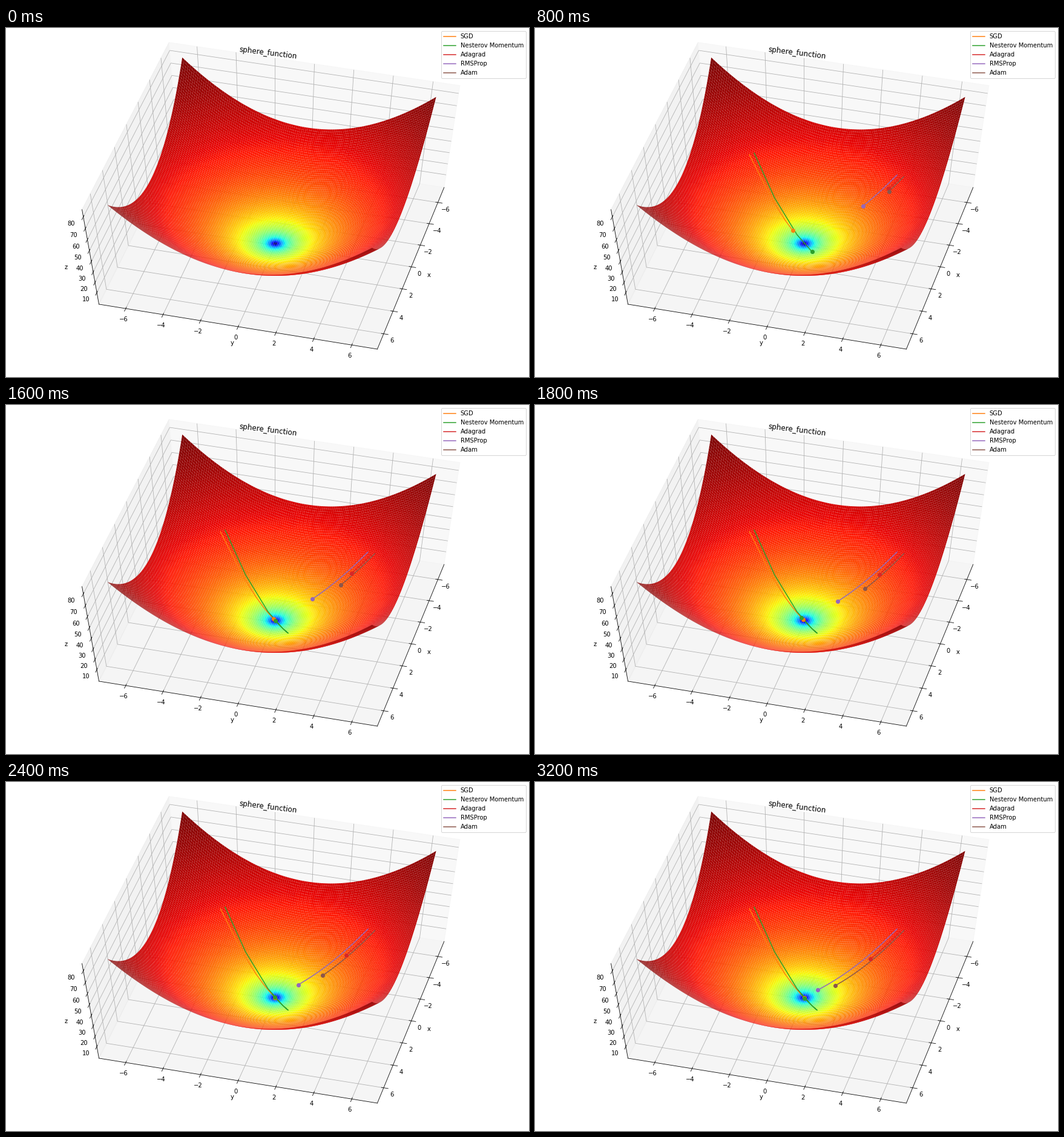
Animation of 864x576 px, one loop 3.4 s. Source, as a matplotlib script:

```python
import numpy as np
import matplotlib.pyplot as plt
from matplotlib.animation import FuncAnimation
from matplotlib.colors import LogNorm

FRAMES, INTERVAL = 17, 200
WIDTH, HEIGHT, DPI = 864, 576, 72
ELEV, AZIM, DIST = 60, 15, 10
LOW = np.array([-7.145, -7.145, 0.0])
HIGH = np.array([7.045, 7.045, 84.5])
RATE = 0.2


def sphere(x, y):
    return x**2 + y**2


def gradient(p):
    return 2 * p


# Each optimizer yields the step to add to the current point.
def sgd(p, n, state):
    return -RATE * gradient(p)


def nesterov(p, n, state, mu=0.9):
    v = mu * state.get("v", 0)
    state["v"] = v - RATE * gradient(p + v)
    return state["v"]


def adagrad(p, n, state):
    g = gradient(p)
    state["s"] = state.get("s", 0) + g**2
    return -RATE * g / np.sqrt(state["s"])


def rmsprop(p, n, state, rho=0.9):
    g = gradient(p)
    state["s"] = rho * state.get("s", 0) + (1 - rho) * g**2
    return -RATE * g / np.sqrt(state["s"])


def adam(p, n, state, b1=0.9, b2=0.999):
    g = gradient(p)
    state["m"] = b1 * state.get("m", 0) + (1 - b1) * g
    state["v"] = b2 * state.get("v", 0) + (1 - b2) * g**2
    return -RATE * state["m"] / (1 - b1**n) / np.sqrt(state["v"] / (1 - b2**n))


def trajectory(step, start):
    points, state = [np.array(start, float)], {}
    for n in range(1, FRAMES):
        points.append(points[-1] + step(points[-1], n, state))
    x, y = np.array(points).T
    return np.array([x, y, sphere(x, y)])


def projection():
    """Perspective view of the limits scaled to a unit cube."""
    e, a = np.radians([ELEV, AZIM])
    right = np.array([-np.sin(a), np.cos(a), 0])
    out = np.array([np.cos(e) * np.cos(a), np.cos(e) * np.sin(a), np.sin(e)])
    up = np.cross(out, right)
    view = np.array([[*right, 0], [*up, 0], [0, 0, 0, -DIST], [*-out, DIST]])
    world = np.diag([*1 / (HIGH - LOW), 1])
    world[:3, 3] = -(LOW + HIGH) / 2 / (HIGH - LOW)
    return view @ world


fig = plt.figure(figsize=(WIDTH / DPI, HEIGHT / DPI), dpi=DPI)
ax = fig.add_axes([0, 0, 1, 1], projection="3d", computed_zorder=False)
ax.view_init(ELEV, AZIM)

# Fill the whole stage instead of a centred square.
matrix = projection()
ax.get_proj = lambda: matrix
ax.apply_aspect = lambda position=None: None
ax.viewLim.intervalx = ax.viewLim.intervaly = (-0.95 / DIST, 0.9 / DIST)

grid = np.arange(-65, 65) / 10
X, Y = np.meshgrid(grid, grid)
ax.plot_surface(X, Y, sphere(X, Y), rstride=1, cstride=1, cmap="jet",
                norm=LogNorm(), edgecolor="none", zorder=1)

OPTIMIZERS = [
    ("SGD", sgd, (-4, -4)),
    ("Nesterov Momentum", nesterov, (-4.2, -3.8)),
    ("Adagrad", adagrad, (-4, 4)),
    ("RMSProp", rmsprop, (-4.2, 3.8)),
    ("Adam", adam, (-4, 4.2)),
]
tracks = []
for k, (label, step, start) in enumerate(OPTIMIZERS, 1):
    line, = ax.plot([], [], [], color=f"C{k}", label=label, zorder=5)
    dot, = ax.plot([], [], [], "o", color=f"C{k}", zorder=6)
    tracks.append((trajectory(step, start), line, dot))

ax.set_xticks(range(-6, 7, 2))
ax.set_yticks(range(-6, 7, 2))
ax.set_zticks(range(10, 81, 10))
ax.set(xlabel="x", ylabel="y", zlabel="z")
margin = (HIGH - LOW) / 48
limits = np.transpose([LOW - margin, HIGH + margin])
for set_limit, (low, high) in zip((ax.set_xlim, ax.set_ylim, ax.set_zlim), limits):
    set_limit(low, high)

ax.legend(loc="upper right")
fig.text(432.5 / WIDTH, 1 - 41.5 / HEIGHT, "sphere_function", fontsize=12,
         rotation=-7, ha="center", va="center")


def update(i):
    for path, line, dot in tracks:
        line.set_data_3d(*path[:, :i])
        dot.set_data_3d(*path[:, max(i - 1, 0):i])
    return [artist for _, *pair in tracks for artist in pair]


anim = FuncAnimation(fig, update, frames=FRAMES, interval=INTERVAL,
                     repeat=True, repeat_delay=0, blit=False)
plt.show()
```
